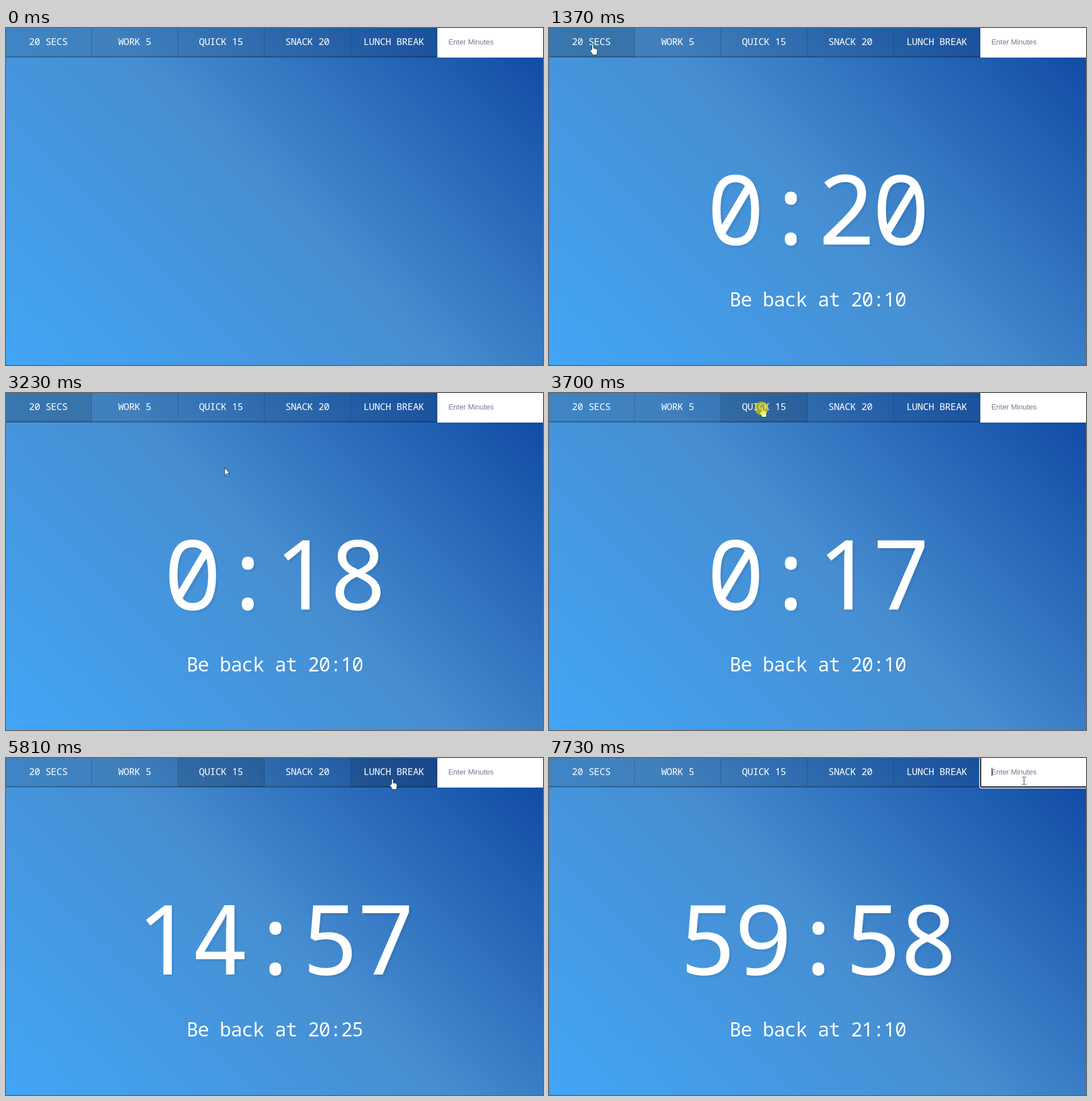
Write an HTML page that moves like this. It is 945 px wide and 593 px high and loops after 8000 ms.

```html
<!DOCTYPE html>
<html lang="en">
<head>
<meta charset="utf-8">
<title>Break timer</title>
<style>
  html, body { margin: 0; width: 100%; height: 100%; overflow: hidden; }
  svg {
    display: block; width: 945px; height: 593px;
    background: linear-gradient(45deg, #42a5f5 0%, #478ed1 50%, #0d47a1 100%);
  }
  text { fill: #fff; text-anchor: middle; font-family: "Noto Sans Mono", "DejaVu Sans Mono", monospace; }
  .plain { font-family: "Noto Sans", "Open Sans", sans-serif; }
  .label { font-size: 17px; }
  #time { font-size: 171px; font-stretch: semi-condensed; text-shadow: 4px 4px 0 rgba(0, 0, 0, .05); }
  #back { font-size: 34px; }
  #hint { font: 12.93px "Liberation Sans", Arial, sans-serif; fill: #757593; text-anchor: start; }
  #focus rect { fill: none; }
  #cursor path { fill: #fff; stroke: #0c2f3c; stroke-width: .9; stroke-linejoin: round; }
  #cursor #beam { fill: none; stroke-width: 1; }
</style>
</head>
<body>
<svg viewBox="0 0 945 593">
  <g id="buttons"></g>
  <rect x="759" width="186" height="52" fill="#fff"/>
  <text id="hint" x="778.5" y="28.5">Enter Minutes</text>
  <g id="focus">
    <rect x="759" y="-9" width="220" height="60.5" rx="2" stroke="#fff" stroke-width="4"/>
    <rect x="759.5" y="-9" width="220" height="60" rx="2" stroke="#101010" stroke-width="2"/>
    <path d="M779.5 17V32" stroke="#000"/>
  </g>
  <text id="time"></text>
  <text id="back"></text>
  <g id="cursor">
    <path id="arrow" d="M0 0V13L3 10.3 5.2 15 7.2 14 5 9.5H9Z"/>
    <path id="hand" d="M-1.5 9V1.5a1.5 1.5 0 0 1 3 0V7q1.2-1 2.4.3q1.3-.6 2.2.6q1.9-.3 1.9 1.7V13q0 3-1.5 5.5H0q-1-3-4.5-7q-.3-1.8 1.3-1.6Z"/>
    <path id="beam" d="M-3.5-6.5H-1L0-5.5 1-6.5H3.5M0-5.5V5.5M-3.5 6.5H-1L0 5.5 1 6.5H3.5"/>
  </g>
  <circle id="click" r="12" fill="#e6dc00" fill-opacity=".6"/>
</svg>
<script>
const LOOP = 8000, PITCH = 152, BAR = 52, INPUT = 5;
const CLOCK = 20 * 60 + 10; // time of day, in minutes
const $ = id => document.getElementById(id);
const show = (el, on) => el.setAttribute("visibility", on ? "visible" : "hidden");
const pair = (a, b) => `${a}:${String(b).padStart(2, "0")}`;

function add(parent, tag, attrs) {
  const el = document.createElementNS("http://www.w3.org/2000/svg", tag);
  for (const key in attrs) el.setAttribute(key, attrs[key]);
  return parent.appendChild(el);
}

// Centres every character in its own cell; the figure 1 has no foot.
function setCells(el, str, cx, y, pitch) {
  if (el.textContent === str) return;
  el.textContent = "";
  [...str].forEach((char, i) => {
    const x = cx + (i - (str.length - 1) / 2) * pitch;
    add(el, "tspan", { x, y, class: char === "1" ? "plain" : "" }).textContent = char;
  });
}

const faces = ["20 SECS", "WORK 5", "QUICK 15", "SNACK 20", "LUNCH BREAK"].map((label, i) => {
  const x = PITCH * i - 1, g = $("buttons");
  const face = add(g, "rect", { x, width: PITCH, height: BAR });
  add(g, "path", { d: `M${x} 49h151v-49h1v52h-152z`, "fill-opacity": .2 });
  setCells(add(g, "text", { class: "label" }), label, x + 75.5, 29.5, 9.7);
  return face;
});

const presses = [
  { target: 0, down: 1220, up: 1300, secs: 20 },
  { target: 2, down: 3700, up: 3780, secs: 15 * 60 },
  { target: 4, down: 6020, up: 6100, secs: 60 * 60 },
  { target: INPUT, down: 7560, up: 7730 }
];

// Pointer moves: start, end, x, y; it rests in between.
const moves = [
  [0, 1, 782, 537], [210, 440, 485, 408], [610, 1150, 77, 29],
  [1450, 2370, 581, 381], [2370, 2640, 500, 457], [2640, 3070, 386, 146],
  [3150, 3530, 375, 24], [3780, 4480, 615, 260], [4550, 4790, 633, 159],
  [5030, 5530, 680, 37], [6330, 6640, 570, 232], [6640, 7100, 748, 86],
  [7180, 7480, 836, 40]
];

function pointer(t) {
  const i = moves.findLastIndex(m => m[0] <= t);
  const [start, end, x, y] = moves[i], [, , x0, y0] = moves[Math.max(0, i - 1)];
  const u = Math.min(1, (t - start) / (end - start));
  const k = u * u * (3 - 2 * u);
  return [x0 + (x - x0) * k, y0 + (y - y0) * k];
}

function pointerKind(x, y, timing) {
  if (y < BAR) return x < PITCH * INPUT ? "hand" : "beam";
  const overText = timing && x > 242 && x < 707 && y > 220 && y < 500;
  return overText ? "beam" : "arrow";
}

function drawTimer(t, session) {
  if (!session) {
    $("time").textContent = $("back").textContent = "";
    return;
  }
  const ticks = Math.floor((t - session.up) / 1000);
  const left = session.secs - (ticks && ticks + 1); // the first tick takes two seconds off
  const end = CLOCK + Math.floor(session.secs / 60);
  setCells($("time"), pair(Math.floor(left / 60), left % 60), 474, 381, 97);
  setCells($("back"), "Be back at " + pair(Math.floor(end / 60), end % 60), 473.5, 490, 19.4);
}

function draw(t) {
  const session = presses.findLast(p => p.secs && p.up <= t);
  const pressed = presses.findLast(p => p.down <= t);
  const [x, y] = pointer(t), kind = pointerKind(x, y, session);
  const hovered = kind === "hand" ? Math.floor(x / PITCH) : -1;

  drawTimer(t, session);
  faces.forEach((face, i) => {
    face.setAttribute("fill-opacity", i === hovered || i === pressed?.target ? .2 : .1);
  });
  show($("focus"), pressed?.target === INPUT);

  $("cursor").setAttribute("transform", `translate(${x} ${y})`);
  for (const id of ["arrow", "hand", "beam"]) show($(id), t >= moves[1][0] && id === kind);
  $("beam").style.stroke = y < BAR ? "#333" : y > 300 ? "#a9cbe9" : "#ac855c";

  const click = $("click");
  click.setAttribute("cx", x - 1);
  click.setAttribute("cy", y + (kind === "hand" ? 3 : -1));
  show(click, pressed && t < pressed.up);
}

const start = performance.now();
function tick() {
  draw((performance.now() - start) % LOOP);
  requestAnimationFrame(tick);
}
tick();
</script>
</body>
</html>
```
